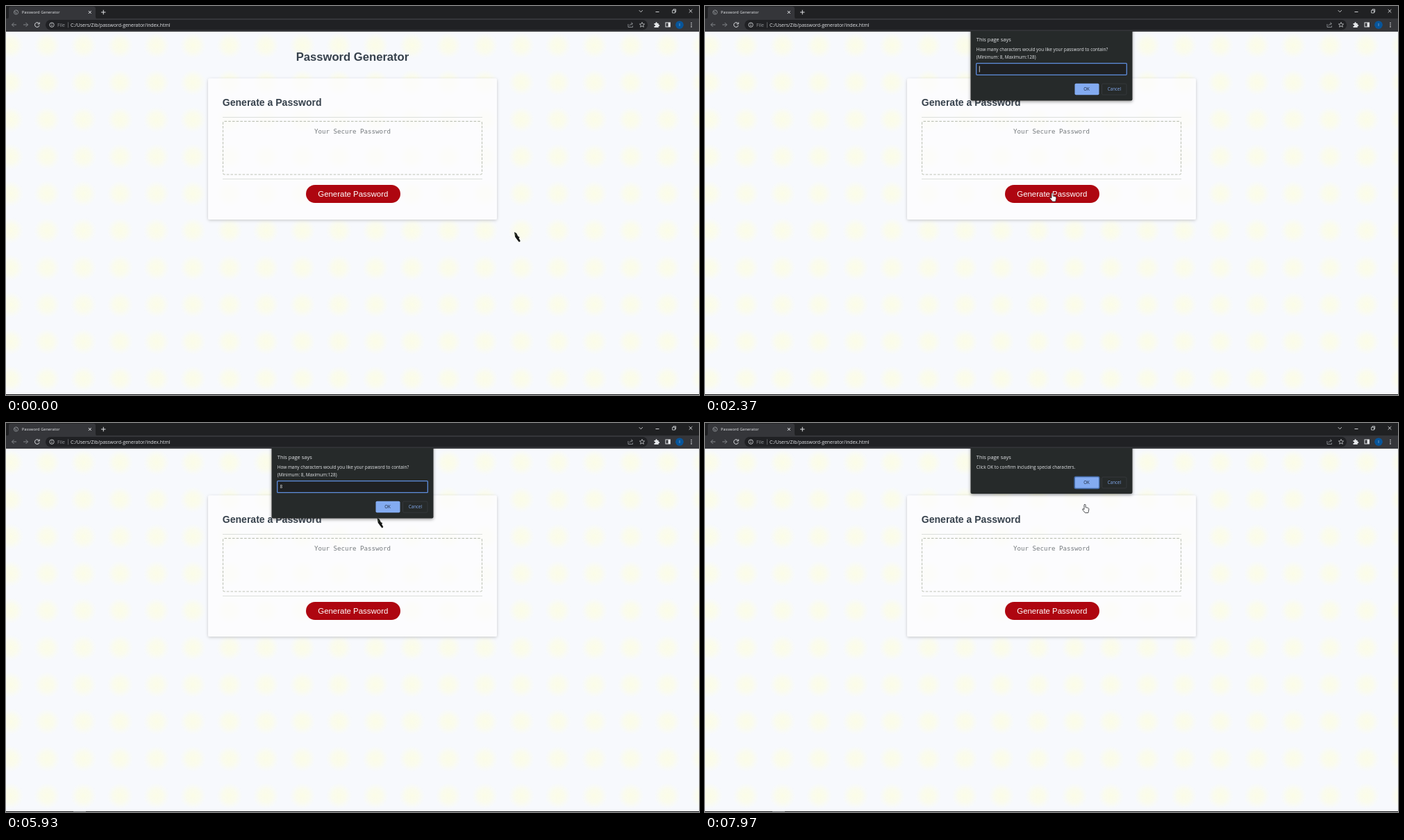
An HTML page that plays this animation: 998x561 px, repeating every 8 s.

```html
<!DOCTYPE html>
<html lang="en">
<head>
<meta charset="utf-8">
<title>Password Generator</title>
<style>
  html, body { margin: 0; width: 100%; height: 100%; overflow: hidden; background: #f7f9fd; }
  svg { display: block; width: 998px; height: 561px; }
  text { font-family: "Open Sans", "Noto Sans", sans-serif; font-size: 6.41px; fill: #e4e6e9; }
  .page { font-family: "Liberation Sans", Arial, sans-serif; fill: #36414c; }
  .bold { font-weight: 700; }
  .mono { font-family: "DejaVu Sans Mono", monospace; font-size: 9.13px; fill: #757a7d; }
  .mid { text-anchor: middle; }
  .line { fill: none; stroke: #dfe1e4; stroke-width: 1; }
  .dim { stroke: #83868a; }
  .ok { fill: #83abf1; }
  .cancel { fill: none; stroke: #3b3e43; stroke-width: .7; }
</style>
</head>
<body>
<svg viewBox="0 0 998 561">
  <defs>
    <radialGradient id="glow">
      <stop offset="0" stop-color="#fbfce7"/>
      <stop offset=".5" stop-color="#fbfce9" stop-opacity=".8"/>
      <stop offset="1" stop-color="#fbfcee" stop-opacity="0"/>
    </radialGradient>
    <pattern id="spots" x="-19.8" y="30.4" width="52.55" height="53.4" patternUnits="userSpaceOnUse">
      <circle cx="26.3" cy="26.7" r="19" fill="url(#glow)"/>
    </pattern>
    <filter id="soft" x="-10%" y="-10%" width="120%" height="125%">
      <feDropShadow dx="0" dy="1.2" stdDeviation="2.2" flood-color="#000" flood-opacity=".2"/>
    </filter>
    <filter id="deep" x="-10%" y="-15%" width="120%" height="140%">
      <feDropShadow dx="0" dy="1.5" stdDeviation="2" flood-color="#000" flood-opacity=".4"/>
    </filter>
    <clipPath id="below"><rect y="36" width="998" height="525"/></clipPath>
    <g id="choices">
      <rect class="ok" x="532.5" y="0" width="35" height="16.5" rx="1.8"/>
      <rect class="cancel" x="571.5" y=".3" width="35.5" height="16" rx="1.8"/>
      <text class="mid" x="549.6" y="10.5" style="font-size:6.2px;fill:#1d2739">OK</text>
      <text class="mid" x="589.4" y="10.5" style="font-size:6.2px;fill:#83abf1">Cancel</text>
    </g>
  </defs>

  <!-- page -->
  <rect width="998" height="561" fill="#f7f9fd"/>
  <rect y="37" width="998" height="523" fill="url(#spots)"/>
  <text class="page bold mid" x="499" y="78.5" style="font-size:16.63px">Password Generator</text>
  <rect x="291" y="104.5" width="416" height="203.5" rx="2.5" fill="#fcfcfe" filter="url(#soft)"/>
  <rect x="291" y="104.5" width="416" height="203.5" rx="2.5" fill="url(#spots)" opacity=".25"/>
  <text class="page bold" x="311.8" y="144" style="font-size:14.04px">Generate a Password</text>
  <path d="M312 160.5H686M312 249.5H686" stroke="#dcdfdc"/>
  <rect x="312.5" y="166.4" width="373" height="76.6" rx="2" fill="none" stroke="#bfc4b8" stroke-width="1.1" stroke-dasharray="3.6 2.1"/>
  <text class="mono mid" x="499" y="184">Your Secure Password</text>
  <rect x="432" y="258" width="136" height="26" rx="13" fill="#ae0610"/>
  <text class="page mid" x="499.8" y="275" style="font-size:11.44px;fill:#fff">Generate Password</text>

  <!-- browser frame -->
  <rect width="998" height="18.5" fill="#202123"/>
  <path d="M1 18.5Q4 18.5 4 15V4Q4 .8 7.500 .8H125.500Q129 .8 129 4V15Q129 18.500 132 18.500Z" fill="#35363a"/>
  <rect y="18" width="998" height="19" fill="#35363a"/>
  <rect x="57" y="20" width="867" height="14.500" rx="7.200" fill="#202124"/>
  <path d="M0 36.700H998" stroke="#4a4c50" stroke-width=".6"/>
  <g class="line dim">
    <circle cx="14.500" cy="9" r="3.100"/>
    <path d="M12 8l2.500 1v2.300M14.500 6l2 1.500" />
    <path d="M31.500 27h-7M0 0" stroke="none"/>
    <path d="M15 27H8.500M11.500 24l-3 3 3 3M25 27h6.500M28.500 24l3 3-3 3"/>
    <path d="M89.500 23.300v8" stroke-width=".6"/>
    <path d="M896 26v4.500h6.500v-2M898 28.500q.5-3 4-3M900.500 23.500l2 2-2 2"/>
  </g>
  <text x="22.800" y="11.200" style="font-size:5.750px">Password Generator</text>
  <text x="74" y="29.500" style="font-size:6.900px;fill:#929599">File</text>
  <text x="93" y="29.500" style="font-size:6.900px">C:/Users/Zib/password-generator/index.html</text>
  <g class="line">
    <path d="M118.800 7l4 4m0-4l-4 4M137 9h6.500M140.250 5.750v6.500"/>
    <path d="M47.500 25.200a3.300 3.300 0 1 0 .5 2.800M48.200 23.500v2.500h-2.500"/>
    <circle cx="66" cy="27.200" r="3.200" stroke-width=".8"/>
    <path d="M66 26.700v2.300M66 25v.9" stroke-width=".8"/>
    <path d="M916 23.500l1.100 2.400 2.500.2-1.900 1.700.6 2.500-2.300-1.400-2.300 1.400.6-2.500-1.900-1.700 2.500-.2z" stroke-width=".7"/>
    <path d="M911.800 6.200l2.500 2.500 2.500-2.500M935.500 8.500h5M983.700 5l4.600 4.600m0-4.600l-4.600 4.600" stroke-width=".9"/>
    <path d="M959.700 6.200h3.800v3.800h-3.800zM961 6v-1.200h3.700v3.900h-1" stroke-width=".8"/>
    <rect x="950" y="24" width="6.500" height="6"/>
  </g>
  <g fill="#e4e6e9">
    <path d="M933.500 25h2v-.7a1.100 1.100 0 0 1 2.200 0v.7h2v2h.5a1.100 1.100 0 0 1 0 2.200h-.5v1.800h-6.200v-1.900h.6a1 1 0 0 0 0-2h-.6z"/>
    <rect x="953.500" y="24" width="3" height="6"/>
    <circle cx="987" cy="24.500" r=".8"/><circle cx="987" cy="27.200" r=".8"/><circle cx="987" cy="29.900" r=".8"/>
  </g>
  <circle cx="970" cy="27.200" r="5.800" fill="#07559b"/>
  <text class="mid" x="970" y="29.300" style="font-size:5.500px">I</text>
  <rect y="560" width="998" height="1" fill="#101112"/>
  <rect id="hint" x="97" y="560" width="18" height="1" fill="#55585b"/>

  <!-- dialogs -->
  <g clip-path="url(#below)">
    <g id="prompt">
      <rect x="382.500" y="32" width="233" height="105.500" rx="2" fill="#282a2c" filter="url(#deep)"/>
      <text x="390.800" y="51.800" style="font-size:7.450px">This page says</text>
      <text x="390.800" y="66.300">How many characters would you like your password to contain?</text>
      <text x="390.800" y="76.700">(Minimum: 8, Maximum:128)</text>
      <rect id="field" x="390.700" y="83.600" width="216.600" height="16.800" rx="1" fill="#1f2123" stroke-width="1.300"/>
      <text id="digit" x="394.600" y="94.300">8</text>
      <rect id="caret" y="87.500" width=".8" height="9" fill="#e8eaed"/>
      <use href="#choices" y="112.800"/>
    </g>
    <g id="confirm">
      <rect x="382.500" y="32" width="233" height="70" rx="2" fill="#282a2c" filter="url(#deep)"/>
      <text x="390.800" y="51.800" style="font-size:7.450px">This page says</text>
      <text x="390.800" y="66.300">Click OK to confirm including special characters.</text>
      <use href="#choices" y="77.700"/>
      <rect x="532.200" y="77.500" width="35.600" height="17" rx="2" fill="none" stroke="#456ca9" stroke-width="1.500"/>
    </g>
  </g>

  <!-- pointer -->
  <g id="arrow">
    <path d="M0 0L3.200 1.800 5.200 6 7.800 7.600 6.500 8.800 8.800 13 7 14.500 4.500 11.500 1.200 7Z" fill="#151716"/>
    <path d="M1.300 2L2.300 5.300" stroke="#4d6340" stroke-width=".7"/>
  </g>
  <path id="hand" d="M-1 1.200Q0-1.200 1.100 1.200V4.600L4.800 5.500Q6.200 6 5.800 8L4.800 12.500H.4L-3.300 8Q-3.500 6.300-2 6.900L-1 7.700Z" fill="#fff" stroke="#25272b" stroke-width=".8"/>
</svg>

<script>
const LOOP = 8000, BLINK = 530;
const $ = id => document.getElementById(id);
const clamp = v => Math.min(1, Math.max(0, v));
const show = (id, on) => { $(id).style.display = on ? "" : "none"; };

const linear = p => p;
const out = p => 1 - (1 - p) ** 2;
const inOut = p => p * p * (3 - 2 * p);

// time, x, y of the pointer tip, easing used to get there
const path = [
  [0, 732, 326, linear], [30, 732, 326, linear], [200, 731, 325, out],
  [770, 731, 325, linear], [1530, 539, 275, inOut], [1630, 539, 275, linear],
  [1650, 519, 267, linear], [1670, 500, 269.5, linear], [5630, 500, 269.5, linear],
  [5930, 534.5, 137, inOut], [6330, 546, 119, out], [7670, 546, 119, linear],
  [7970, 547, 117, out], [LOOP, 547, 117, linear]
];

function tip(t) {
  const i = path.findIndex(k => k[0] > t);
  const a = path[i - 1], b = path[i];
  const p = b[3]((t - a[0]) / (b[0] - a[0]));
  return [a[1] + (b[1] - a[1]) * p, a[2] + (b[2] - a[2]) * p];
}

// Slide in from above; slide back up while fading
function dialog(id, t, open, close) {
  const inP = clamp((t - open) / 200), outP = clamp((t - close) / 100);
  show(id, t >= open && outP < 1);
  const y = -12 * (1 - inP) ** 2 - 5 * outP;
  $(id).setAttribute("transform", `translate(0 ${y.toFixed(2)})`);
  $(id).style.opacity = Math.min(clamp(inP * 2), clamp(1.4 - outP * 1.4));
}

function draw(t) {
  const typed = t >= 4200, focus = t < 6830;
  dialog("prompt", t, 2230, 6930);
  dialog("confirm", t, 7130, Infinity);
  show("digit", typed);
  show("hint", t >= 4570);
  $("field").setAttribute("stroke", focus ? "#5f8fdf" : "#26292c");

  const since = t - (typed ? 4200 : 2240);
  show("caret", focus && Math.floor(since / BLINK) % 2 === 0);
  $("caret").setAttribute("x", typed ? 398.8 : 394.8);

  const [x, y] = tip(t);
  const overButton = t < 5640 && x > 432 && x < 568 && y > 258 && y < 284;
  const overOk = t > 5640 && x > 532 && y < 129.5;
  const hand = overButton || overOk;
  show("hand", hand);
  show("arrow", !hand);
  $(hand ? "hand" : "arrow").setAttribute("transform", `translate(${x.toFixed(2)} ${y.toFixed(2)})`);
}

const start = performance.now();
function tick() {
  draw((performance.now() - start) % LOOP);
  requestAnimationFrame(tick);
}
tick();
</script>
</body>
</html>
```
